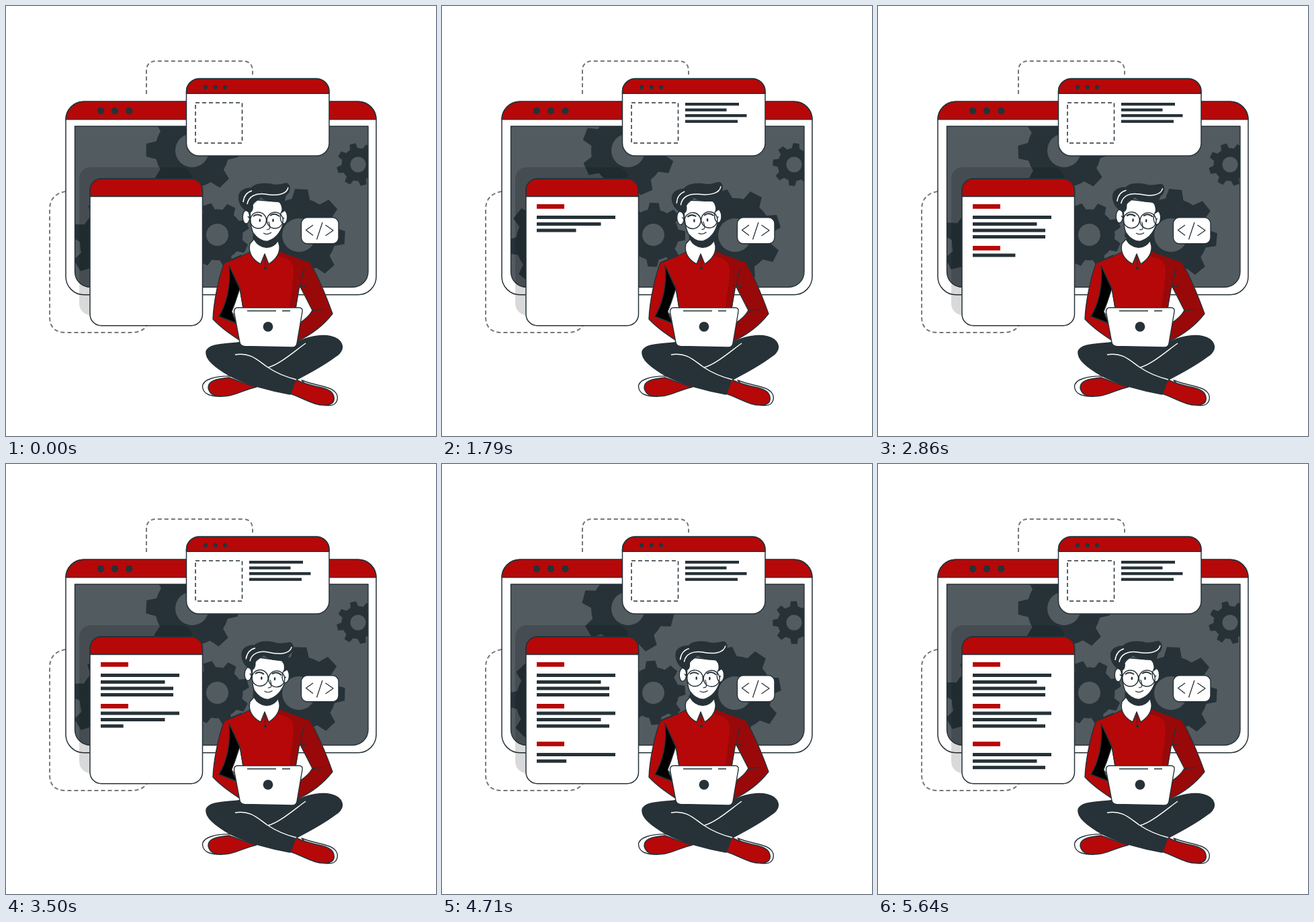
Animation, 640 px wide and 640 px high, one loop 5.71 s. Source, as an HTML page with a canvas:

```html
<!DOCTYPE html>
<html lang="en">
<head>
<meta charset="utf-8">
<title>Developer at work</title>
<style>
  html, body { margin: 0; width: 100%; height: 100%; overflow: hidden; background: #fff; }
  canvas { display: block; width: 640px; height: 640px; }
</style>
</head>
<body>
<canvas id="stage" width="640" height="640"></canvas>
<script>
const ctx = document.getElementById('stage').getContext('2d');
const LOOP = 5710, TURN = 5640;
const INK = '#263238', RED = '#b60808', DEEP_RED = '#990909', GREY = '#525b60', WHITE = '#fff';
const RAD = Math.PI / 180;

function paint(path, fill, stroke, width = 1.4) {
  if (fill) { ctx.fillStyle = fill; ctx.fill(path); }
  if (stroke) { ctx.strokeStyle = stroke; ctx.lineWidth = width; ctx.stroke(path); }
}
const shape = (d, fill, stroke, width) => paint(new Path2D(d), fill, stroke, width);
const line = (d, color = INK, width = 1.4) => shape(d, null, color, width);

function oval(x, y, rx, ry, fill, stroke, width) {
  const path = new Path2D();
  path.ellipse(x, y, rx, ry, 0, 0, 2 * Math.PI);
  paint(path, fill, stroke, width);
}
const dot = (x, y, r, fill = INK) => oval(x, y, r, r, fill);

function box(x, y, w, h, radii) {
  const path = new Path2D();
  path.roundRect(x, y, w, h, radii);
  return path;
}

function dashed(d, color, width) {
  ctx.setLineDash([6, 4]);
  line(d, color, width);
  ctx.setLineDash([]);
}

function panel(x, y, w, h, r, header) {
  paint(box(x, y, w, h, r), WHITE);
  paint(box(x, y, w, header, [r, r, 0, 0]), RED, INK);
  paint(box(x, y, w, h, r), null, INK, 1.5);
}

// Gears: centre, outer radius, valley radius, hole radius, start angle, direction
const gears = [
  [277, 215, 69, 55, 25, 0.5, -1],
  [436, 341, 69, 55, 25, 3, 1],
  [314.5, 340.5, 48, 38, 16.5, -64, -1],
  [165, 352, 69, 55, 25, 15, 1],
  [524, 236, 32, 24.5, 11.5, -105, -1]
];

function drawGear([x, y, outer, valley, hole, start, dir], turn) {
  const path = new Path2D();
  const at = (r, deg) => path.lineTo(x + r * Math.cos(deg * RAD), y + r * Math.sin(deg * RAD));
  for (let i = 0; i < 8; i++) {
    const a = start + dir * turn * 360 + i * 45;
    at(valley, a - 14);
    at(outer, a - 8);
    at(outer, a + 8);
    at(valley, a + 14);
    path.arc(x, y, valley, (a + 14) * RAD, (a + 31) * RAD);
  }
  path.closePath();
  paint(path, INK);
  dot(x, y, hole, GREY);
}

// Typed lines: x, y, width, height, start time, duration, colour
const topLines = [[144, 80], [152.5, 61.5], [161, 91.5], [169.6, 78]]
  .map(([y, w], i) => [362, y, w, 4.3, 55 + i * 318, 600, INK]);
const LONG = 117, MID = 95.5, SHORT = 108;
const cardLines = [
  [295, 41, 80, RED], [312, LONG, 477], [322, MID, 856], [331.5, SHORT, 1520], [341, SHORT, 1880],
  [357, 41, 2230, RED], [368.5, LONG, 2590], [378, MID, 2970], [387.5, SHORT, 3345],
  [413.3, 41, 3720, RED], [430, LONG, 4095], [439.7, MID, 4480], [449.2, SHORT, 4865]
].map(([y, w, start, color = INK]) => [141, y, w, color === RED ? 6.8 : 5, start, 500, color]);

function typeLine([x, y, w, h, start, duration, color], t) {
  const part = Math.min(1, Math.max(0, (t - start) / duration));
  ctx.fillStyle = color;
  ctx.fillRect(x, y, w * part, h);
}

// Head tilt: [time, degrees], joined by a smooth curve
const tilt = [[0, 0], [1050, -5], [1790, -3], [2860, 2.2], [3600, 3.2], [4210, 2.6], [5210, 0], [5710, 0]];

function tiltAt(t) {
  const i = Math.max(0, tilt.findIndex(k => k[0] > t) - 1);
  const [t0, v0] = tilt[i], [t1, v1] = tilt[i + 1];
  const slope = j => {
    if (j <= 0 || j >= tilt.length - 1) return 0;
    const a = (tilt[j][1] - tilt[j - 1][1]) / (tilt[j][0] - tilt[j - 1][0]);
    const b = (tilt[j + 1][1] - tilt[j][1]) / (tilt[j + 1][0] - tilt[j][0]);
    return a * b > 0 ? 2 * a * b / (a + b) : 0;
  };
  const d = t1 - t0, u = (t - t0) / d, v = 1 - u;
  return v0 * v * v * (1 + 2 * u) + v1 * u * u * (3 - 2 * u)
    + d * u * v * (slope(i) * v - slope(i + 1) * u);
}

function drawWindows(t) {
  const turn = Math.min(1, t / TURN);
  dashed('M209 131V97Q209 82 224 82H352Q367 82 367 97V102', '#777', 2);
  dashed('M89 276Q65 280 65 303V462Q65 486 89 486H187Q203 486 211 474', '#777', 2);

  panel(89, 142.3, 462, 287.5, 27, 26.5);
  [141, 162, 183.3].forEach(x => dot(x, 156, 5.2));
  const screen = box(102.5, 179, 436.5, 239.5, [0, 0, 23, 23]);
  paint(screen, GREY);
  ctx.save();
  ctx.clip(screen);
  gears.forEach(g => drawGear(g, turn));
  ctx.restore();
  paint(screen, null, INK);

  paint(box(109, 240, 168, 220, 17), 'rgba(0,0,0,.15)');
  panel(125, 257, 167.5, 218.8, 17, 26.5);
  cardLines.forEach(l => typeLine(l, t));

  panel(268.5, 108.3, 212.5, 114.7, 19, 22);
  [297, 311.8, 326].forEach(x => dot(x, 120.8, 3.1));
  dashed('M282 144H351.5V204H282Z', INK, 1.5);
  topLines.forEach(l => typeLine(l, t));

  paint(box(439.5, 314.8, 55.5, 39, 9), WHITE, INK);
  line('M457 326L446.5 333.5L457 341.5M471 322L462.5 347.5M475.5 326L487 334L475.5 342', INK, 1.3);
}

function drawLegs() {
  shape('M336 551C312 550 292 556 292.500 567C294 579 306 581 320 581L372 567Z', WHITE, INK);
  shape('M332 553C312 555 300 558 301 569C304 582 318 582 332 580C346 577 358 570 373 567C358 563 345 558 332 553Z', RED, INK);
  shape('M440 557C455 563 470 565 478 568C489 571 495 578 493 586C491 594 485 596 474 594Z', WHITE, INK);
  shape('M431 556C445 563 460 566 470 568C482 571 490 577 488 587C486 596 470 595 460 592C448 588 435 581 423 577Z', RED, INK);
  shape('M436 499C455 490 480 487 494 496C505 505 501 515 490 522C470 537 450 547 431 557L423 578C395 573 356 563 332 550C312 538 296 526 298 514C303 501 330 504 352 500Z', INK, INK);
  line('M341 519C365 515 375 528 390 538C405 548 420 553 432 556M390 538C408 533 429 514 446 502', WHITE, 1.5);
}

function drawBody() {
  // left arm, right arm, torso
  shape('M325 382C317 402 309 440 308 466C320 479 335 489 350 499L345 473L317 462C331 440 337 414 332 386L350 371Z', RED, INK);
  shape('M425 371C437 376 446 378 452 381C464 402 476 430 486 458C472 476 455 489 433 499L438 471C446 466 452 460 456 453L437 416Z', DEEP_RED, INK);
  shape('M332 386L348 421L341 442L336 455L343 472L317 462C329 442 335 414 332 386Z', '#000', INK);
  shape('M348 421L341 442L336 455L341 462L353 449Z', WHITE, INK, 1);
  shape('M363 366C352 372 337 378 326 382L332 386L348 420L353 455H431L437 416L444 391L452 381C440 377 424 371 406 364Z', RED);
  shape('M404 372C421 376 428 381 428 393C428 410 423 433 422 452H431L437 416L448 419L452 381C440 377 424 371 406 364Z', DEEP_RED);
  line('M353 450L348 420L332 386M326 382C337 378 352 372 363 366M406 364C424 371 440 377 452 381M431 450L437 416L448 419M444 391C441 399 439 407 439 415M455 455Q463 451 474 452');
}

function drawHead(t) {
  ctx.save();
  ctx.translate(385, 365);
  ctx.rotate(tiltAt(t) * RAD);
  ctx.translate(-385, -365);
  shape('M369 334L407 332V351C398 362 377 361 370 351Z', INK, INK);
  shape('M365 288C362 305 363 327 368 338C374 346 382 351 390 350C402 346 408 338 412 326L414 292Z', WHITE, INK);
  oval(357.500, 314, 5.2, 10, WHITE, INK);
  oval(413.500, 314, 5.2, 10, WHITE, INK);
  shape('M361 306C350 302 345 290 347 281C349 274 357 271 365 271C372 263 385 264 393 265C404 269 412 264 418 264C425 268 422 278 417 281C413 288 414 296 415 304L411 307C412 298 409 292 404 290C393 292 385 289 379 284C375 290 370 290 367 296C368 304 365 308 361 306Z', INK, INK);
  line('M353 292C354 283 359 277 366 275M359 295C361 283 372 278 386 280C402 283 418 281 420 270', WHITE, 1.5);
  oval(375.500, 319, 12, 12, null, INK);
  oval(400.300, 319, 12, 12, null, INK);
  line('M387.500 317Q388 315 388.500 317M363.500 317L360 313M412 317L414 315');
  oval(377.800, 319, 1.3, 2.5, INK);
  oval(397.500, 319, 1.3, 2.5, INK);
  line('M368 313Q374 308 381 313M393 312Q400 307 407 313', INK, 2);
  line('M391 321Q394 330 392 332L388 333M383 338Q389 341.500 395 337', INK, 1.2);
  ctx.restore();
}

function drawFront() {
  shape('M369 347L363 354C360 367 367 378 379 384L385 369L391 384C402 377 408 368 407 357L405 349C397 363 378 363 369 347Z', WHITE, INK);
  line('M385 369L386 386');
  dot(386, 390, 2.2);
  shape('M345 449H436Q442 449 441 455L433 502Q432 508 426 508L355 506.500Q349 506 348 501L339.500 456Q339 449 345 449Z', WHITE, INK);
  line('M359 453.800H402M411 453.800H423');
  dot(390, 477.3, 7.4);
}

function draw(t) {
  ctx.fillStyle = WHITE;
  ctx.fillRect(0, 0, 640, 640);
  ctx.lineJoin = 'round';
  drawWindows(t);
  drawLegs();
  drawBody();
  drawHead(t);
  drawFront();
}

const begin = performance.now();
function tick() {
  draw((performance.now() - begin) % LOOP);
  requestAnimationFrame(tick);
}
tick();
</script>
</body>
</html>
```
